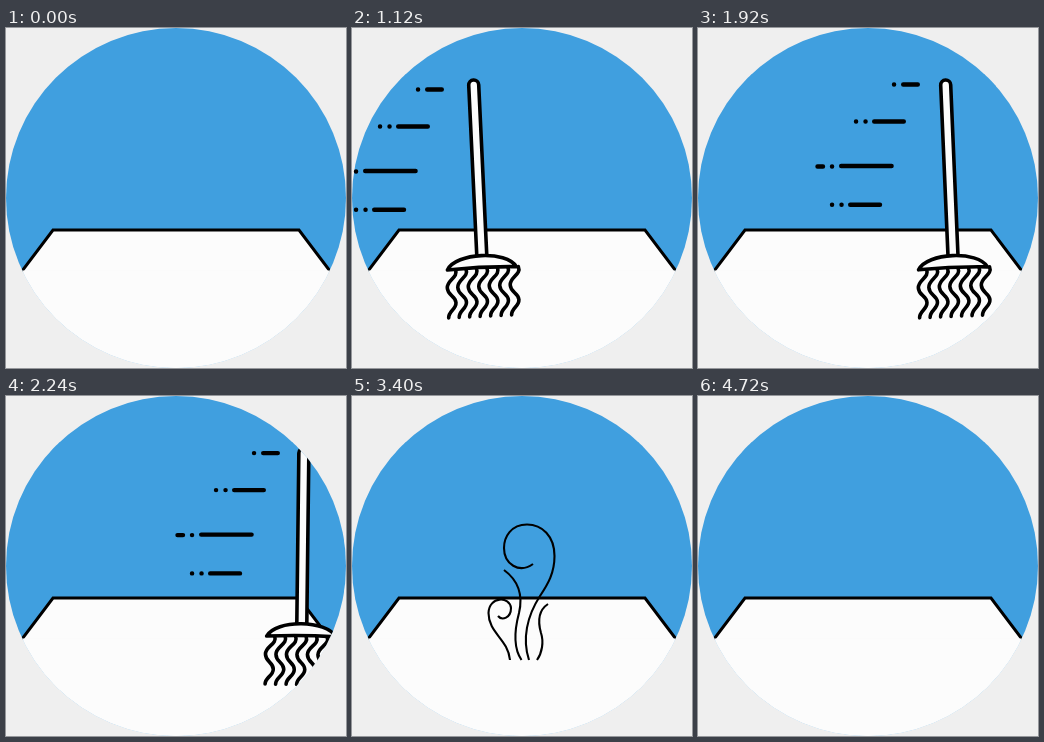
An HTML page that plays this animation: 340 by 340 pixels, repeating every 5 s.

```html
<!DOCTYPE html>
<html lang="en">
<head>
<meta charset="utf-8">
<title>Mop</title>
<style>
  html, body { margin: 0; width: 100%; height: 100%; overflow: hidden; background: #efefef; }
  svg { display: block; width: 100%; height: 100%; }
  path { fill: none; stroke: #000; }
  #table { fill: #fcfcfc; stroke-width: 3; }
  #mop path { stroke-width: 3.6; stroke-linecap: round; stroke-linejoin: round; }
  #mop .solid { fill: #fcfcfc; }
  #mop .bundle { fill: #fcfcfc; stroke: none; }
  #speed path { stroke-width: 4.4; stroke-linecap: round; }
  #steam path { stroke-width: 2.1; stroke-dasharray: 1 3; stroke-dashoffset: 1; }
</style>
</head>
<body>
<svg viewBox="0 0 340 340">
  <clipPath id="disc"><circle cx="170" cy="170" r="170"/></clipPath>
  <circle cx="170" cy="170" r="170" fill="#409fdf"/>
  <g clip-path="url(#disc)">
    <path id="table" d="M-27 300 L47 202 H293 L367 300 V360 H-27 Z"/>
    <path d="M0 242.5 H340 V340 H0 Z" style="fill:#fcfcfc;stroke:none"/>
    <g id="mop">
      <path class="bundle" d="M-32 187 L-37 234 H28 L35 187 Z"/>
      <g id="strands"></g>
      <path class="solid" d="M-5 178 V4.5 a5 5 0 0 1 10 0 V178"/>
      <path class="solid" d="M-35 188 C-26 171 25 171 34 188 Q0 186 -35 188 Z"/>
    </g>
  </g>
  <g id="speed">
    <path d="M196 56.5 h.1 M205.2 56.5 h14.6"/>
    <path d="M158 93.5 h.1 M167.5 93.5 h.1 M176.2 93.5 h29.6"/>
    <path d="M119.5 138.5 h5.5 M134 138.5 h.1 M143.2 138 h50.4"/>
    <path d="M134 176.8 h.1 M143.5 176.8 h.1 M152.2 176.8 h29.8"/>
  </g>
  <g id="steam">
    <path pathLength="1" d="M158 264 C156 243 136.5 237 136.5 217 C137 200 158 200 159 212 C159 222 150 225 146 220"/>
    <path pathLength="1" d="M169.5 264 C160 250 163 232 167 217 C171 200 167 185 152 174"/>
    <path pathLength="1" d="M177 264 C170 243 175 220 188 200 C196 188 202.5 177 202.5 160 C202.5 140 190 128.5 175 128.5 C159 128.5 152 141 152 152 C152 168 167 178 181 168"/>
    <path pathLength="1" d="M185 264 C190 257 192 246 189 237 C185 223 187 214 196 208"/>
  </g>
</svg>
<script>
const LOOP = 5000, STEP = 40;
const $ = id => document.getElementById(id);
const mop = $('mop'), speed = $('speed');
const curls = document.querySelectorAll('#steam path');

$('strands').innerHTML = Array.from({ length: 7 }, (_, i) =>
  `<path d="M${-27 + 10.5 * i} 188 c3 8 -9 10 -9 18 s8 8 8 15 s-8 8 -8 15"/>`).join('');

const progress = (t, from, to) => Math.min(1, Math.max(0, (t - from) / (to - from)));

// Vertical drift of the speed lines: [time, offset]
const drift = [[0, 10.5], [720, 7], [1120, 5], [1920, 0], [2560, 1.2], [5000, 1.2]];
function interpolate(points, t) {
  const i = Math.max(1, points.findIndex(p => p[0] >= t));
  const [[t0, a], [t1, b]] = [points[i - 1], points[i]];
  return a + (b - a) * progress(t, t0, t1);
}

function render(t) {
  // The mop glides right while swinging around the top of its handle
  const x = 58.5 + 0.1575 * (t - 720);
  const swing = 3.1 * Math.cos((t - 776) / 820 * 2 * Math.PI);
  mop.setAttribute('transform', `translate(${x} 52.5) rotate(${swing})`);

  speed.setAttribute('transform', `translate(${0.1625 * (t - 1920)} ${interpolate(drift, t)})`);
  speed.setAttribute('opacity', 1 - progress(t, 2480, 2840));

  const offset = 1 - progress(t, 2840, 3400) - progress(t, 4120, 4720);
  curls.forEach(c => { c.style.strokeDashoffset = offset; });
}

function tick() {
  render(Math.floor(performance.now() % LOOP / STEP) * STEP);
  requestAnimationFrame(tick);
}
tick();
</script>
</body>
</html>
```
